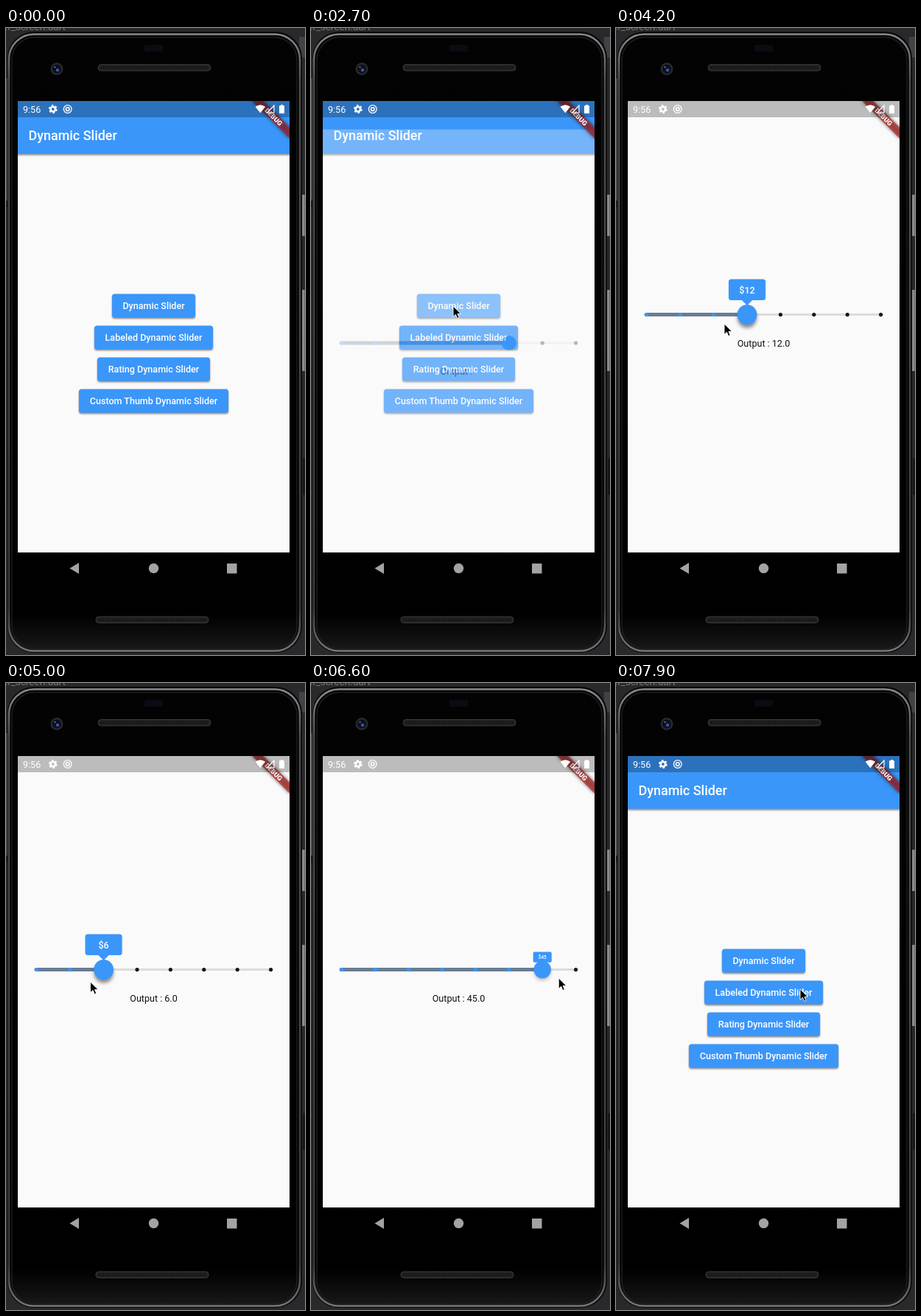
Animation, 406 px wide and 850 px high, one loop 8 s. Source, as an HTML page:

```html
<!DOCTYPE html>
<html lang="en">
<head>
<meta charset="utf-8">
<title>Dynamic Slider</title>
<style>
  html, body { margin: 0; width: 100%; height: 100%; overflow: hidden; background: #29292c; }
  svg { display: block; width: 406px; height: 850px; font-family: Roboto, sans-serif; font-size: 12.57px; }
  .mid { font-weight: 500; fill: #fff; text-anchor: middle; }
  .blue { fill: #3b96f9; }
</style>
</head>
<body>
<svg viewBox="0 0 406 850">
  <defs>
    <linearGradient id="body" x1="0" y1="0" x2="0" y2="1">
      <stop offset="0" stop-color="#030303"/>
      <stop offset=".94" stop-color="#000"/>
      <stop offset="1" stop-color="#191919"/>
    </linearGradient>
    <linearGradient id="rim" x1="0" y1="0" x2="0" y2="1">
      <stop offset="0" stop-color="#8a8a8c"/>
      <stop offset=".08" stop-color="#4c4c4e"/>
      <stop offset=".93" stop-color="#3a3a3c"/>
      <stop offset="1" stop-color="#77777a"/>
    </linearGradient>
    <filter id="soft" x="-50%" y="-50%" width="200%" height="200%"><feGaussianBlur stdDeviation="1.3"/></filter>
    <filter id="wide" x="-50%" y="-50%" width="200%" height="200%"><feGaussianBlur stdDeviation="2.8"/></filter>
    <clipPath id="screen"><path d="M16 99h369v612H16z"/></clipPath>
  </defs>

  <!-- desktop behind the phone -->
  <path d="M0 0h406v850H0z" fill="#29292c"/>
  <text x="-5" y="3" font-size="13.5" fill="#77777b">er_screen.dart</text>
  <path d="M0 68h4v170H0z" fill="#48484a"/>
  <path d="M0 234h4v9H0z" fill="#1b1b1d"/>
  <path d="M398 12h8v28h-8z" fill="#424246"/>
  <path d="M401 226h5v56h-5zM401 355h5v110h-5z" fill="#77777a"/>
  <path d="M403 226h1v56h-1zM403 355h1v110h-1z" fill="#a0a0a2"/>
  <path d="M403 583h3v50h-3z" fill="#161618"/>

  <!-- phone -->
  <rect x="2" y="5" width="400" height="842" rx="36" fill="#0a0a0a"/>
  <rect x="4" y="8.5" width="395" height="836" rx="34" fill="url(#body)" stroke="url(#rim)" stroke-width="2.5"/>
  <rect x="8" y="12.5" width="387" height="829" rx="31" fill="none" stroke="#1f1f20" stroke-width="1.4"/>
  <rect x="188" y="23" width="25" height="9" rx="2" fill="#0b0c13"/>
  <g fill="#202021" stroke="#3b3b3c">
    <rect x="125" y="49.500" width="153" height="8.500" rx="4"/>
    <rect x="122" y="798" width="153" height="8.500" rx="4"/>
  </g>
  <g fill="none" stroke="#101010" stroke-width="3" stroke-dasharray="1 2">
    <path d="M129 53.800h145M126 802.300h145"/>
  </g>
  <circle cx="69" cy="55.500" r="8.500" fill="#29292d"/>
  <circle cx="69" cy="55.500" r="6" fill="#0c0f1e"/>
  <circle cx="70" cy="57" r="2.200" fill="#3a55a4"/>
  <circle cx="66.500" cy="53" r="1" fill="#8389a0"/>
  <g fill="#a3a3a3">
    <path d="M86.500 732.500L99 725v15z"/>
    <circle cx="200.500" cy="732.500" r="6.700"/>
    <path d="M300 726h13.500v13.500H300z"/>
  </g>

  <g clip-path="url(#screen)">
    <!-- home -->
    <path d="M16 99h369v612H16z" fill="#fafafa"/>
    <path d="M10 99h381v73.500H10z" opacity=".42" filter="url(#soft)"/>
    <path d="M16 99h369v71.500H16z" class="blue"/>
    <text x="30.500" y="152.300" font-size="17.960" font-weight="500" fill="#fff">Dynamic Slider</text>
    <g id="menu"></g>
    <rect id="splash" x="144" y="360.500" width="113" height="32" rx="3.500" fill="#fff" opacity="0"/>

    <!-- slider page -->
    <g id="page">
      <path d="M16 99h369v612H16z" fill="#fafafa"/>
      <path d="M40 388.600H361" stroke="#dcdcdc" stroke-width="3" stroke-linecap="round"/>
      <path id="track" stroke="#687d92" stroke-width="5" stroke-linecap="round"/>
      <g id="ticks"></g>
      <g id="thumb">
        <circle id="shade" cy="4" r="10" opacity=".4" filter="url(#wide)"/>
        <circle id="knob" r="10" class="blue"/>
        <g id="label">
          <path class="blue" d="M-21.500-48.200h43a3.600 3.600 0 0 1 3.600 3.600v21.500a3.600 3.600 0 0 1-3.600 3.600H7.200L0-12.500-7.200-19.500H-21.500a3.600 3.600 0 0 1-3.600-3.600v-21.500a3.600 3.600 0 0 1 3.600-3.600z"/>
          <text id="price" class="mid" y="-29"></text>
        </g>
      </g>
      <text id="output" x="200.500" y="432" text-anchor="middle" fill="#111"></text>
    </g>

    <!-- debug ribbon -->
    <g transform="translate(385 99) rotate(45)">
      <path d="M-36 25.100h72v10.800h-72z" opacity=".5" filter="url(#wide)"/>
      <path d="M-36 25.100h72v10.800h-72z" fill="#b71c1c" fill-opacity=".63"/>
      <text y="33.800" text-anchor="middle" font-size="9.160" font-weight="900" fill="#fff">DEBUG</text>
    </g>

    <!-- status bar -->
    <path d="M16 99h369v22H16z" opacity=".25"/>
    <g fill="#fff">
      <text x="23" y="114.700">9:56</text>
      <path d="M338.500 106.800q6.800-5 13.600 0l-6.800 8.400z"/>
      <path d="M364 105v10h-9.500z" fill="none" stroke="#fff" stroke-width="1.200"/>
      <path d="M371 105.200h2v-1.200h3v1.200h2v10.600h-7z"/>
    </g>
    <g fill="none" stroke="#fff">
      <circle cx="63.800" cy="110" r="3.200" stroke-width="2.600"/>
      <circle cx="63.800" cy="110" r="5" stroke-width="1.800" stroke-dasharray="2.620"/>
      <circle cx="83.700" cy="110" r="5.400" stroke-width="1.300"/>
      <circle cx="83.700" cy="110" r="2.300" stroke-width="1.600"/>
    </g>
  </g>

  <path id="cursor" d="M0 0V14.500L3.400 11.300 5.700 16.600 8.100 15.600 5.900 10.500 10.500 10.400z" stroke="#fff" stroke-width=".9"/>
</svg>

<script>
const LOOP = 8000, STEP = 100;
const $ = id => document.getElementById(id);
const clamp = v => Math.min(1, Math.max(0, v));
const tickX = i => 41.8 + 45.4 * i;

const prices = [1, 3, 6, 12, 18, 30, 45, 60];
const firstPick = 5;
// [time, tick index]
const picks = [[3700, 4], [4000, 3], [4300, 2], [4500, 1], [4800, 2],
               [5400, 3], [5600, 4], [5800, 5], [6200, 6]];
// [time, x, y]
const path = [[1000, 407, 724], [1700, 243, 490], [1900, 243, 490], [2200, 193, 377],
              [2700, 193, 377], [3300, 262, 393], [3500, 266, 396], [4200, 147, 401],
              [4600, 84, 404], [4700, 84, 404], [5200, 135, 406], [5800, 262, 399],
              [6400, 311, 402], [6500, 311, 402], [6900, 412, 394], [7500, 412, 500],
              [7800, 250, 415], [8000, 250, 415]];

function bezier(x1, y1, x2, y2) {
  const at = (a, b, u) => 3 * a * u * (1 - u) ** 2 + 3 * b * u * u * (1 - u) + u ** 3;
  return x => {
    if (x <= 0 || x >= 1) return clamp(x);
    let lo = 0, hi = 1;
    for (let i = 0; i < 20; i++) {
      const mid = (lo + hi) / 2;
      if (at(x1, x2, mid) < x) lo = mid; else hi = mid;
    }
    return at(y1, y2, lo);
  };
}
const slide = bezier(.4, 0, .2, 1), fade = bezier(.42, 0, 1, 1);

const pickAt = t => picks.reduce((last, [time, i]) => time <= t ? i : last, firstPick);

function cursorAt(t) {
  const n = path.findIndex(p => p[0] > t);
  if (n < 1) return null;
  const [a, b] = [path[n - 1], path[n]];
  const k = (t - a[0]) / (b[0] - a[0]);
  return [a[1] + (b[1] - a[1]) * k, a[2] + (b[2] - a[2]) * k];
}

const menu = [["Dynamic Slider", 113], ["Labeled Dynamic Slider", 161],
              ["Rating Dynamic Slider", 153], ["Custom Thumb Dynamic Slider", 203]];
$("menu").innerHTML = menu.map(([name, w], i) => {
  const y = 360.5 + 43 * i;
  const box = `x="${200.5 - w / 2}" width="${w}" height="32" rx="3.5"`;
  return `<rect ${box} y="${y + 1.7}" opacity=".45" filter="url(#soft)"/>
    <rect ${box} y="${y}" class="blue"/>
    <text class="mid" x="200.5" y="${y + 20.4}">${name}</text>`;
}).join("");
$("ticks").innerHTML = prices.map((_, i) => `<circle cx="${tickX(i)}" cy="388.6" r="2.6"/>`).join("");
const ticks = [...$("ticks").children];

function set(id, attrs) {
  for (const k in attrs) $(id).setAttribute(k, attrs[k]);
}

function draw(t) {
  const open = t < 5000 ? clamp((t - 2556) / 300) : 1 - clamp((t - 7350) / 300);
  set("page", { opacity: fade(open), transform: `translate(0 ${153 * (1 - slide(open))})` });
  set("splash", { opacity: t < 2500 || t > 2800 ? 0 : t < 2600 ? .1 : .18 });

  // the thumb trails the chosen value by one step
  const now = pickAt(t), shown = pickAt(t - STEP), x = tickX(shown);
  const press = clamp((t - 3400) / 200) - clamp((t - 6500) / 200);
  set("track", { d: `M41 388.6H${x}` });
  ticks.forEach((c, i) => c.setAttribute("fill", i <= shown ? "#3b96f9" : "#161616"));
  set("thumb", { transform: `translate(${x} 388.6)` });
  set("knob", { r: 10 + 3.5 * press });
  set("shade", { r: 9 + 4 * press, cy: 1 + 4 * press, opacity: .12 + .33 * press });
  set("label", { transform: `scale(${press})` });
  $("price").textContent = "$" + prices[shown];
  $("output").textContent = "Output : " + (t < 3500 ? "\u00a0" : prices[now].toFixed(1));

  const [cx, cy] = cursorAt(t) || [-50, -50];
  set("cursor", { transform: `translate(${cx} ${cy})` });
}

function tick() {
  draw(Math.floor(performance.now() % LOOP / STEP) * STEP);
  requestAnimationFrame(tick);
}
tick();
</script>
</body>
</html>
```
